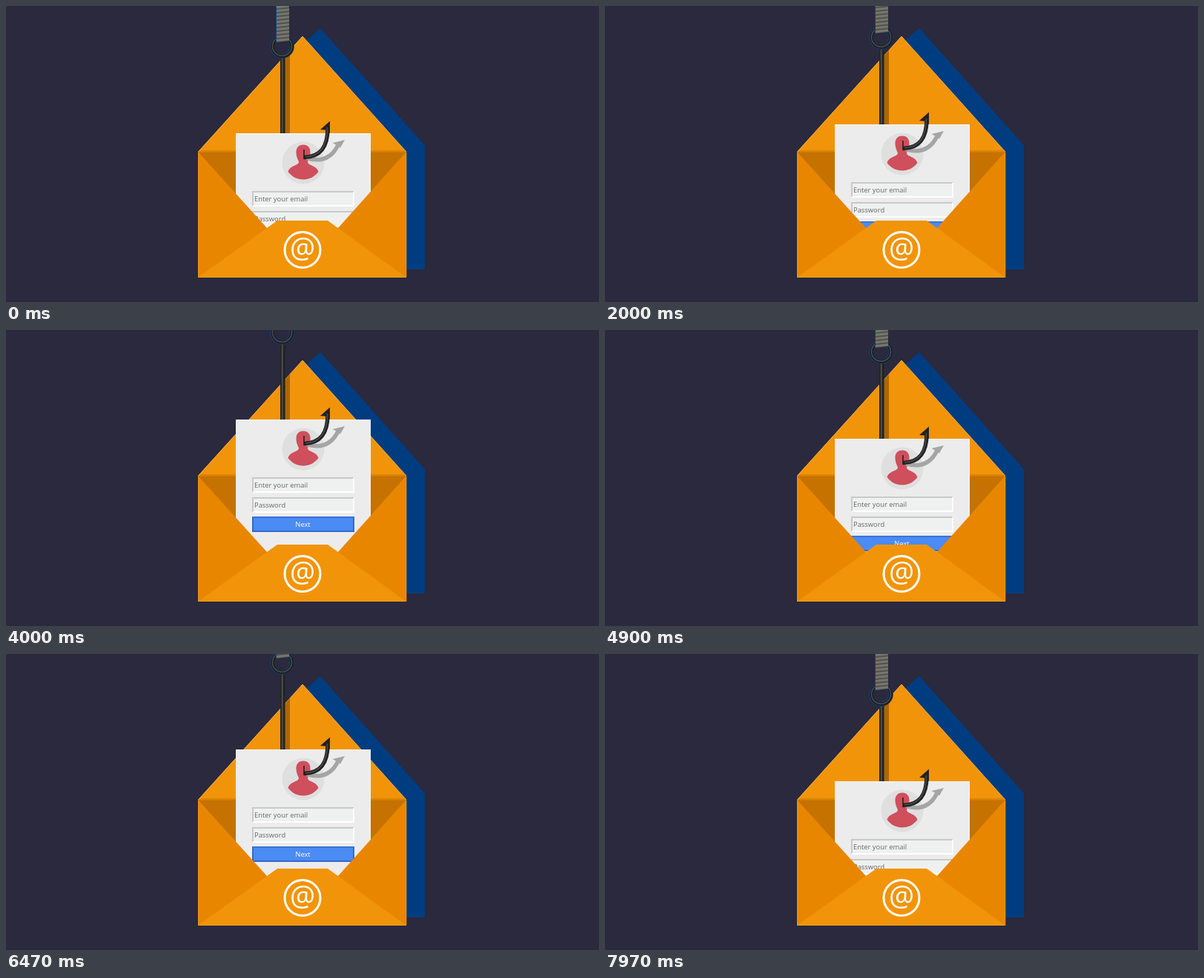
Recreate the animation shown at these times as an HTML page. Size 800 by 400 pixels, loop 8000 ms.

```html
<!DOCTYPE html>
<html lang="en">
<head>
<meta charset="utf-8">
<title>Phishing mail</title>
<style>
  html, body { margin: 0; width: 100%; height: 100%; overflow: hidden; background: #2a293d; }
  svg { display: block; width: 800px; height: 400px; }
  text { font-family: "Open Sans", "Noto Sans", sans-serif; }
  .label { font-size: 9.4px; fill: #666; }
  .line { fill: none; }
</style>
</head>
<body>
<svg viewBox="0 0 800 400">
  <defs>
    <clipPath id="inside"><path d="M400 41 540 197V300H259V197Z"/></clipPath>
    <pattern id="twist" width="18" height="5" patternUnits="userSpaceOnUse" patternTransform="translate(365 0) skewY(-6)">
      <path fill="#76766f" d="M0 0h18v5H0z"/>
      <path fill="#484845" d="M0 3.4h18v1.6H0z"/>
    </pattern>
  </defs>

  <!-- Envelope back -->
  <path fill="#003c80" d="M424 30 565 188V356H400V51Z"/>
  <path fill="#c57200" d="M259 197H540V300H259Z"/>
  <path fill="#f1940a" d="M400 41 540 197H259Z"/>
  <path fill="#dc8400" d="M261 195H538L540 197.500H259Z"/>
  <path class="line" stroke="#f8ae45" d="M259.500 197 400 41 540 197"/>
  <path fill="#ad6700" clip-path="url(#inside)" d="M375 40h8v260h-8z"/>

  <g class="bait">
    <!-- Ring, shank and rope -->
    <path fill="#222" d="M370 68h6.500v130H370z"/>
    <path fill="#464646" d="M371.500 68h2.500v130h-2.500z"/>
    <circle class="line" cx="372.500" cy="54.500" r="13" stroke="#0a4384" stroke-width="6.500"/>
    <circle class="line" cx="372.800" cy="54.500" r="13" stroke="#202020" stroke-width="5"/>
    <circle class="line" cx="372.500" cy="54.200" r="13" stroke="#4b4b4b" stroke-width="1.500"/>
    <path fill="#0a4384" d="M364 -60h2V49h-2z"/>
    <path fill="url(#twist)" d="M365 -60h17V47l-17 2z"/>

    <!-- Card -->
    <path fill="#ececec" d="M310 172h182v187H310z"/>
    <path class="line" stroke="#f8f8f8" d="M310 172.500H491.500V359"/>
    <circle cx="401" cy="212" r="28.500" fill="#dfdfdf"/>
    <path fill="#cf4f5c" d="M401 187.500C407.500 187.500 411 192 410.500 199C410 205 408 208 407 210.500C407 216 419 215 421.500 224C416 231 409 234.500 401 234.500S386 231 380.500 224C383 215 395 216 395 210.500C394 208 392 205 391.500 199C391 192 394.500 187.500 401 187.500Z"/>
    <g id="fields"></g>
    <path fill="#4b8bf4" d="M332 303h138v21H332z"/>
    <path fill="#3469c8" d="M332 303v21h138v-21l-2 2v17H334V305z"/>
    <path fill="#3b74d6" d="M332 303h138l-2 2H334z"/>
    <text x="400.500" y="317" text-anchor="middle" font-size="9.400" fill="#fff">Next</text>

    <!-- Hook point and its shadow -->
    <path class="line" stroke="#a5a5a5" stroke-width="5.500" d="M406 205.500C427 212 440 204 448 188"/>
    <path fill="#a5a5a5" d="M457 181 440.500 185 445 187.500 451 191.500Z"/>
    <path class="line" stroke="#222" stroke-width="1.600" d="M402 194v13"/>
    <path class="line" stroke="#222" stroke-width="5.500" d="M402 204.500C425 204 434 190 434 165"/>
    <path fill="#222" d="M437 155.500V172L431 167.500 424 167Z"/>
    <path class="line" stroke="#4b4b4b" stroke-width="1.500" d="M404 204C423 203 433.500 190 433.500 164"/>
  </g>

  <!-- Envelope front -->
  <path fill="#e98600" d="M259 197 352 300H448L540 197V367H259Z"/>
  <path fill="#f1940a" d="M259 367 352 300 366 290H434L448 300 540 367Z"/>
  <path class="line" stroke="#f5a02a" stroke-width=".7" d="M259.500 367V198M540 198V366.500H259"/>
  <circle class="line" cx="400" cy="329.500" r="24" stroke="#fff" stroke-width="3"/>
  <text x="400" y="340.500" text-anchor="middle" font-size="38" fill="#fff">@</text>
</svg>
<script>
  const LOOP = 8000;
  // Turning points of the pull: [time in ms, height in px]
  const pulls = [[0, 0], [830, 24], [2000, 12], [3240, 71], [4900, 25], [6470, 43], [LOOP, 0]];
  const bait = document.querySelector('.bait');

  const field = (y, label) => `
    <path fill="#eff1f0" d="M332 ${y}h138v21H332z"/>
    <path fill="#c9c9c9" d="M332 ${y}h138l-2 2H334v17l-2 2z"/>
    <path fill="#fff" d="M470 ${y}v21H332l2-2h134v-17z"/>
    <text class="label" x="335" y="${y + 13.7}">${label}</text>`;
  document.getElementById('fields').innerHTML = field(250, 'Enter your email') + field(277, 'Password');

  function height(t) {
    const i = pulls.findIndex(([time]) => time > t);
    const [t0, h0] = pulls[i - 1], [t1, h1] = pulls[i];
    const ease = (1 - Math.cos(Math.PI * (t - t0) / (t1 - t0))) / 2;
    return h0 + (h1 - h0) * ease;
  }

  function draw() {
    bait.setAttribute('transform', `translate(0 ${-height(performance.now() % LOOP)})`);
    requestAnimationFrame(draw);
  }
  draw();
</script>
</body>
</html>
```
